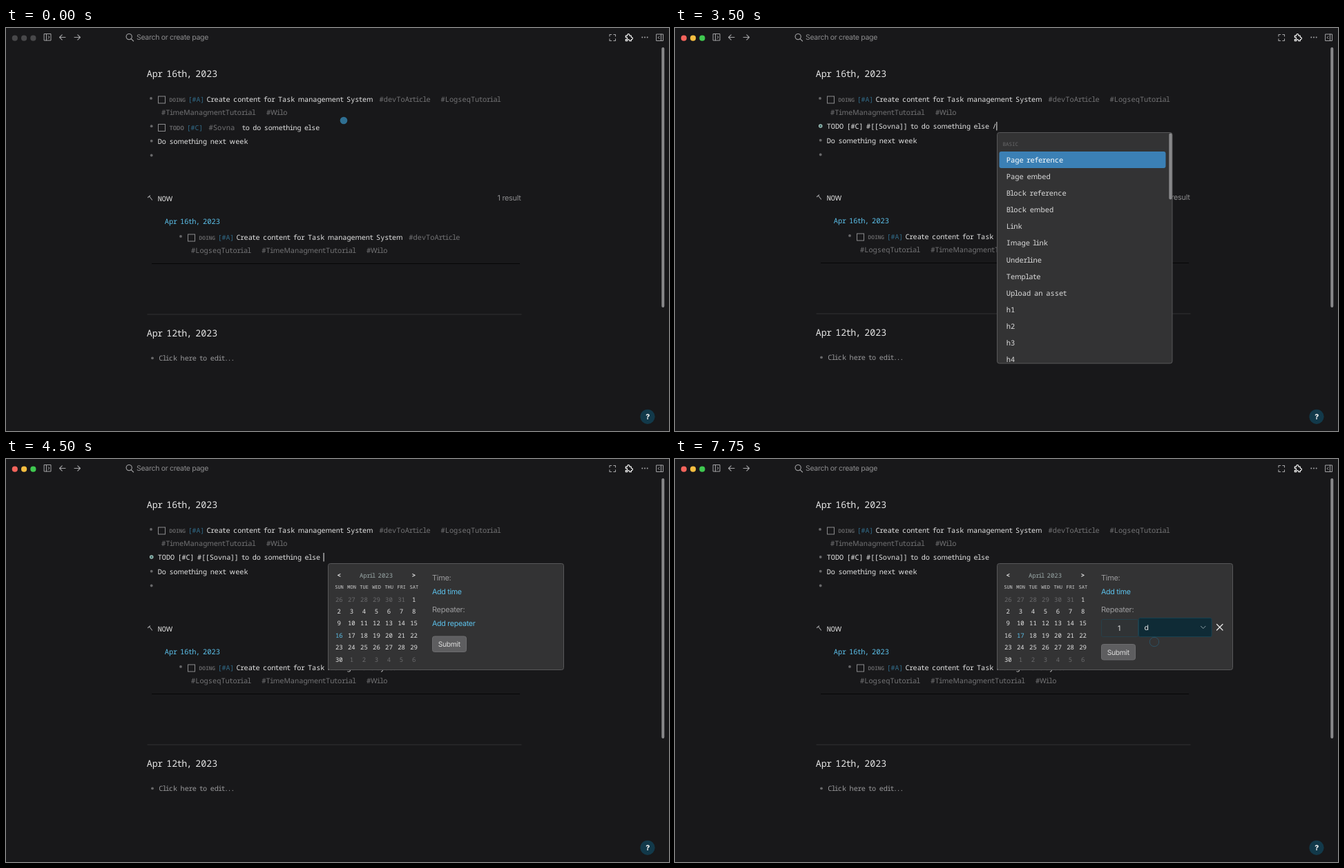
Recreate the animation shown at these times as an HTML page. Size 960 by 584 pixels, loop 8000 ms.

```html
<!DOCTYPE html>
<html lang="en">
<head>
<meta charset="utf-8">
<title>Scheduling a task</title>
<style>
html, body { margin: 0; width: 100%; height: 100%; overflow: hidden; background: #18181a; }
svg { display: block; width: 960px; height: 584px; text-rendering: geometricPrecision; }
.mono { font-family: "Noto Sans Mono", "DejaVu Sans Mono", monospace; text-anchor: middle; }
.wide { font-family: "Noto Sans", "DejaVu Sans", sans-serif; }
.sans { font-family: Inter, "Liberation Sans", sans-serif; letter-spacing: -.3px; }
</style>
</head>
<body>
<svg id="stage" viewBox="0 0 960 584"></svg>
<script>
const stage = document.getElementById('stage');
const WHITE = '#e4e4e4', GREY = '#737375', BLUE = '#5cc0ea', DIM = '#626264', TAG = '#316a88';
const LOOP = 8000, STEP = 250;

// Four-width typewriter face: wide m and w, narrow i, l, t and spaces.
const cell = c => /[mwMW]/.test(c) ? 1.5 : /[il]/.test(c) ? .7 : /[rf]/.test(c) ? .82
  : /[t ,.:]/.test(c) ? .75 : /[[\]\/]/.test(c) ? .95 : 1;
const widthOf = (s, u) => [...s].reduce((sum, c) => sum + cell(c) * u, 0);
const markUp = s => s.replace(/</g, '&lt;').replace(/[mwMW]/g, '<tspan class="wide">$&</tspan>');

function mono(s, x, y, fill = WHITE, u = 6.1, weight = 500) {
  const centres = [...s].map(c => {
    const w = cell(c) * u;
    x += w;
    return (x - w / 2).toFixed(2);
  });
  return `<text class="mono" x="${centres.join(' ')}" y="${y}" fill="${fill}" font-size="${(u / .6).toFixed(2)}" font-weight="${weight}">${markUp(s)}</text>`;
}
const centred = (s, x, y, fill, u, weight) => mono(s, x - widthOf(s, u) / 2, y, fill, u, weight);
const sans = (s, x, y, fill, size = 10.7, more = '') =>
  `<text class="sans" x="${x}" y="${y}" fill="${fill}" font-size="${size}" ${more}>${s}</text>`;
const rect = (x, y, w, h, fill, rx = 0, stroke = 'none') =>
  `<rect x="${x}" y="${y}" width="${w}" height="${h}" rx="${rx}" fill="${fill}" stroke="${stroke}"/>`;
const dot = (x, y, r, fill, stroke = 'none', more = '') =>
  `<circle cx="${x}" cy="${y}" r="${r}" fill="${fill}" stroke="${stroke}" ${more}/>`;
const line = (d, stroke, w = 1) =>
  `<path d="${d}" fill="none" stroke="${stroke}" stroke-width="${w}" stroke-linecap="round" stroke-linejoin="round"/>`;
const panel = (w, h) => rect(466.5, 151.5, w, h, '#333334', 3, '#575759');
const bullet = (x, y) => dot(x, y, 1.9, '#68686a');
const checkbox = (x, y) => rect(x, y, 10, 10, 'none', 0, '#8a8a8c');

function toolbar(active) {
  const lights = active ? ['#f4645c', '#f6be40', '#3fc950'] : Array(3).fill('#48484a');
  const icon = '#a2a2a4';
  return lights.map((c, i) => dot(12.8 + i * 13.3, 14.7, 4.1, c)).join('')
    + line('M55.5 8.5h9.5v9.5h-9.5zM58.5 8.5v9.5M61 11.5l2 1.8-2 1.8', icon)
    + line('M86 13.5h-8.5m3.7-3.7l-3.7 3.7 3.7 3.7M99 13.5h8.5m-3.7-3.7l3.7 3.7-3.7 3.7', icon, 1.1)
    + dot(178.2, 12.6, 4.1, 'none', icon, 'stroke-width="1.1"') + line('M181.2 15.6l3.4 3.4', icon, 1.1)
    + sans('Search or create page', 189, 17.3, '#8c8c8e', 10.5)
    + line('M874 12v-2.5h2.7M879.8 9.5h2.7v2.5M882.5 15.8v2.7h-2.7M876.7 18.5h-2.7v-2.7', icon, 1.1)
    + line('M897.3 11.2h2.5a1.7 1.7 0 1 1 3 0h2.5v2.3a1.6 1.6 0 1 1 0 3v2.2h-2.5a1.6 1.6 0 1 0-3 0h-2.5v-2.3a1.6 1.6 0 1 0 0-2.8z', '#f0f0f0', 1.2)
    + [921.3, 925, 928.7].map(x => dot(x, 13.6, 1, icon)).join('')
    + line('M942 9h9.5v9.5H942zM948.5 9v9.5M946 12l-1.8 1.8 1.8 1.8', icon)
    + rect(949.3, 28, 4, 377, '#88888a', 2);
}

// A task line wrapped over two rows; tags are [label, x, row].
const task = (x, y, tags) =>
  bullet(x - 15, y - 1.6) + checkbox(x - 4.5, y - 4.5)
  + mono('DOING', x + 11.5, y + 3.3, DIM, 4.7, 700) + mono('[#A]', x + 39, y + 3.8, TAG, 5.9)
  + mono('Create content for Task management System', x + 65.5, y + 3.8)
  + tags.map(([s, tx, row]) => mono(s, tx, y + 3.8 + row * 18.3, GREY, 6.2)).join('');

function page(s) {
  const y = s.plain ? -1 : 0;
  let out = mono('Apr 16th, 2023', 203.7, 70.6, WHITE, 8)
    + task(225, 103.5, [['#devToArticle', 540.5, 0], ['#LogseqTutorial', 629.5, 0],
      ['#TimeManagmentTutorial', 225, 1], ['#Wilo', 377, 1]]);
  if (s.plain) {
    out += s.editing ? dot(210.7, 142, 2.2, '#3f6d68', '#a3c4bd', 'stroke-width="1.2"') : bullet(210.7, 142);
    out += mono('TODO [#C] #[[Sovna]] to do something else' + s.typed, 219.7, 145.8);
    if (s.caret) out += rect(s.caret, 136, 1, 12.5, '#f0f0f0');
  } else {
    out += bullet(210.7, 142.2) + checkbox(220.5, 139.5)
      + mono('TODO', 236.5, 147.6, DIM, 5.3, 700) + mono('[#C]', 262, 148, TAG, 5.9)
      + mono('#Sovna', 293.5, 148, GREY, 6.3) + mono('to do something else', 342.3, 148, WHITE, 6);
  }
  return out + bullet(210.7, 163.7 + y) + mono('Do something next week', 219.7, 167.7 + y)
    + bullet(210.7, 184.5 + y)
    + line(`M205.5 ${245.5 + y}l3-2.5M207.5 ${244 + y}l4 5`, '#9a9a9c', 1.2)
    + mono('NOW', 219.7, 251.2 + y) + sans('1 result', 711.5, 250.2 + y, '#8c8c8e', 10.9)
    + mono('Apr 16th, 2023', 229.8, 284 + y, BLUE, 6.25)
    + task(268, 303.5 + y, [['#devToArticle', 583.3, 0], ['#LogseqTutorial', 268, 1],
      ['#TimeManagmentTutorial', 370.3, 1], ['#Wilo', 522, 1]])
    + rect(211, 341 + y, 533, 1, '#060607') + rect(204.5, 414.5 + y, 542, 1, '#303032')
    + mono('Apr 12th, 2023', 203.7, 446.7 + y, WHITE, 8)
    + bullet(212, 478.3 + y) + mono('Click here to edit...', 221.2, 482 + y, '#9a9a9c')
    + dot(929, 563.3, 10.6, '#12394a')
    + sans('?', 929.2, 567.2, '#f0f0f0', 10.5, 'font-weight="800" text-anchor="middle"');
}

function commandMenu() {
  const items = ['Page reference', 'Page embed', 'Block reference', 'Block embed', 'Link', 'Image link',
    'Underline', 'Template', 'Upload an asset', 'h1', 'h2', 'h3', 'h4'];
  return panel(253.5, 334.5) + mono('BASIC', 474.5, 170.7, '#69696b', 4.5)
    + rect(469.5, 179, 241, 24, '#3b80b5', 3)
    + items.map((s, i) => mono(s, 479.7, 194.9 + i * 24.1, i ? '#dcdcdc' : '#fff', 6.25)).join('')
    + rect(715.3, 152.5, 4.4, 96, '#88888a', 2.2);
}

const filteredMenu = () => panel(253.5, 35.5) + rect(469.5, 157.5, 245, 24, '#3b80b5', 3)
  + mono('Scheduled', 479.7, 173.4, '#fff', 6.3);

function calendar(s) {
  let out = panel(341, 154) + centred('<', 482.3, 171.8, WHITE, 6, 700) + centred('>', 590.5, 171.8, WHITE, 6, 700)
    + mono('April 2023', 512, 171.8, '#9aa8a8', 5.35);
  ['SUN', 'MON', 'TUE', 'WED', 'THU', 'FRI', 'SAT'].forEach((d, i) =>
    out += `<text class="mono" x="${482.5 + i * 18.05}" y="188" font-size="7" font-weight="500" fill="#d0d0d0">${d}</text>`);
  for (let i = 0; i < 42; i++) {
    const day = i - 5, x = 482.3 + i % 7 * 18.05, y = 203.2 + Math.floor(i / 7) * 17.42;
    const inMonth = day > 0 && day < 31, hover = day === s.hover;
    const label = inMonth ? day : day < 1 ? day + 31 : day - 30;
    if (hover) out += rect(x - 9, y - 8.8, 18, 17.6, '#55b8e6', 2.5);
    out += centred(String(label), x, y + 3.4, hover ? '#fff' : !inMonth ? '#6a6a6c' : day === s.day ? BLUE : WHITE, 5.4, hover ? 700 : 500);
  }
  const submitY = s.repeat ? 268.5 : 257;
  out += sans('Time:', 617, 176.3, '#9a9a9c', 11) + sans('Add time', 617, 196, BLUE)
    + sans('Repeater:', 617, 221.8, '#9a9a9c', 11);
  out += s.repeat
    ? rect(617.5, 232.5, 53, 25, '#303335', 2, '#27404a') + sans('1', 641, 248.6, WHITE, 10.5)
      + rect(671.5, 230.5, 105.5, 27, '#0f2b36', 2, '#17414f') + sans('d', 679.5, 247.7, WHITE, 10.5)
      + line('M761.5 242.3l3.3 3.3 3.3-3.3', '#8fa3aa') + line('M784.5 239.5l8.5 8.5M793 239.5l-8.5 8.5', '#e8e8e8', 1.3)
    : sans('Add repeater', 617, 241.6, BLUE);
  return out + rect(617.5, submitY, 49, 22.5, '#5e5e60', 3, '#6c6c6e') + sans('Submit', 625.7, submitY + 15.2, '#dcdcdc', 10.3);
}

// Pointer stops: time, x, y; it is hidden between the two journeys.
const PATH = [
  [[0, 489, 134], [500, 480, 141], [1000, 470, 150], [1500, 470, 159.5]],
  [[5250, 521, 273], [5750, 512, 264], [6500, 505, 258], [6750, 528, 262], [7250, 647, 240], [7500, 639, 254], [7750, 694, 265]]
];
function pointer(t) {
  const legs = PATH.find(p => t >= p[0][0] && t <= p[p.length - 1][0]);
  if (!legs) return '';
  const i = Math.max(1, legs.findIndex(p => p[0] >= t));
  const [t0, x0, y0] = legs[i - 1], [t1, x1, y1] = legs[i], k = (t - t0) / (t1 - t0);
  const x = x0 + (x1 - x0) * k, y = y0 + (y1 - y0) * k;
  const pressed = [0, 750, 6500, 7250].includes(t), faint = t === 1500 || t === 6750;
  return pressed ? dot(x, y, 5.3, '#2f6f92')
    : dot(x, y, 6.7, 'none', '#2b566c', `opacity="${faint ? .35 : .85}"`);
}

function stateAt(t) {
  const between = (a, b) => t >= a && t < b;
  const typed = between(3500, 3750) ? ' /' : between(3750, 4000) ? ' /sc' : between(4000, 4500) ? ' /sch'
    : t < 1500 || between(2750, 3000) ? '' : ' ';
  const editing = between(750, 6500);
  const blinkOff = between(2250, 2750) || between(5000, 5500) || between(6000, 6500);
  return {
    typed, editing, plain: t >= 750,
    caret: editing && !blinkOff && 455 + widthOf(typed, 6.1),
    day: t < 6500 ? 16 : 17,
    hover: between(6000, 6750) ? 17 : between(6750, 7000) ? 18 : null,
    repeat: t >= 7500,
    popup: t < 3500 ? null : t < 3750 ? commandMenu : t < 4500 ? filteredMenu : calendar
  };
}

let shown = -1;
function draw(now) {
  const t = Math.floor(now % LOOP / STEP) * STEP;
  if (t !== shown) {
    shown = t;
    const s = stateAt(t);
    stage.innerHTML = toolbar(t >= 250) + page(s) + (s.popup ? s.popup(s) : '') + pointer(t);
  }
}
const start = performance.now();
function tick() {
  draw(performance.now() - start);
  requestAnimationFrame(tick);
}
tick();
</script>
</body>
</html>
```
